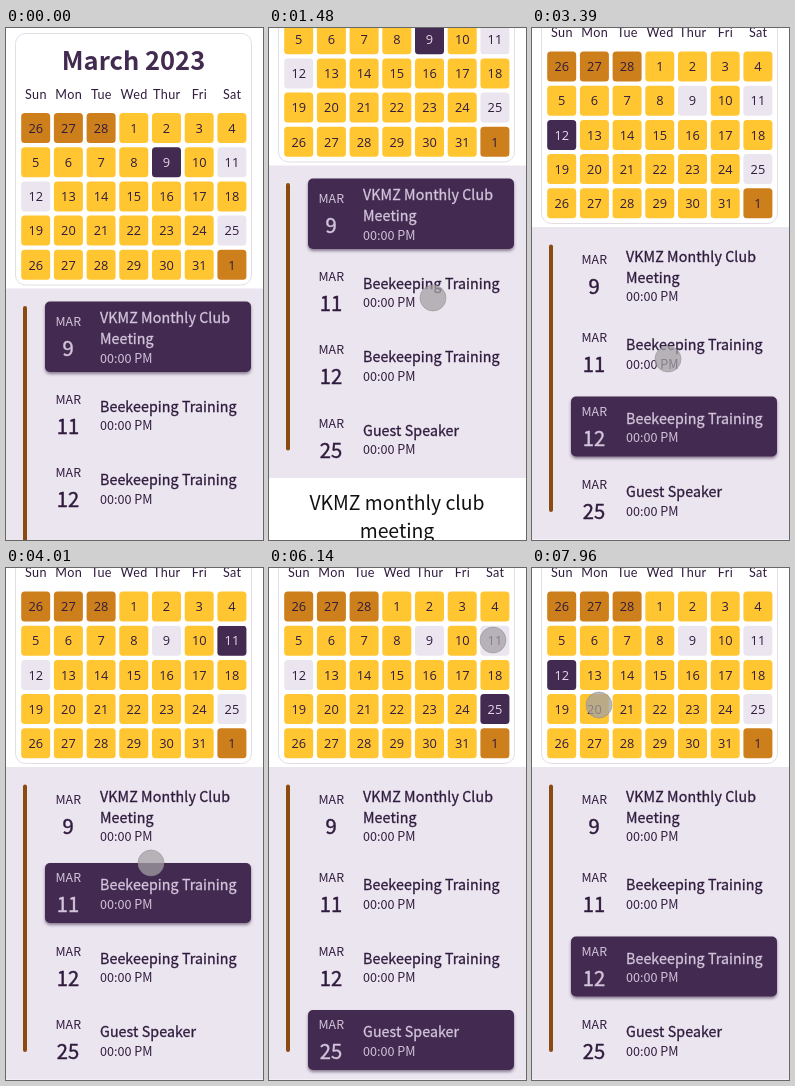
Animation, 257 px wide and 512 px high, one loop 8000 ms. Source, as an HTML page:

```html
<!DOCTYPE html>
<html lang="en">
<head>
<meta charset="utf-8">
<title>Event calendar</title>
<style>
  html, body { margin: 0; width: 100%; height: 100%; overflow: hidden; background: #fff; }
  svg { display: block; width: 257px; height: 512px; }
  text {
    font-family: "Noto Sans CJK JP", "Noto Sans CJK SC", "Noto Sans CJK", "Noto Sans", sans-serif;
    fill: #2f1b3d;
  }
  .mid { text-anchor: middle; }
  .month { font-size: 25.5px; font-weight: 700; fill: #432a50; }
  .week { font: 12.6px Lato, sans-serif; letter-spacing: .4px; }
  .day { font: 12.8px "Open Sans", sans-serif; }
  .mar { font-size: 12.4px; }
  .num { font-size: 20.2px; stroke: #2f1b3d; stroke-width: .4px; }
  .name { font-size: 14.2px; letter-spacing: .1px; stroke: #2f1b3d; stroke-width: .3px; }
  .time { font-size: 12.6px; }
  .detail { font-size: 19.4px; fill: #111; }
  .on text { fill: #d3c5dc; stroke: none; }
  .on .name, .on .num { stroke: #d3c5dc; }
  .on .day { fill: #e4d9ea; }
  .on .card { filter: drop-shadow(0 2px 1.5px rgba(40, 20, 50, .5)); }
</style>
</head>
<body>
<svg viewBox="0 0 257 512"><g id="page"></g><g id="cursor"></g></svg>
<script>
const LOOP = 8000, FADE = 140;
const PLUM = '#432a50', LILAC = '#ebe5f0', GOLD = '#ffc631', OCHRE = '#cd7f1c';
const page = document.getElementById('page');
const cursor = document.getElementById('cursor');

function add(parent, tag, attrs, content) {
  const el = document.createElementNS('http://www.w3.org/2000/svg', tag);
  for (const key in attrs) el.setAttribute(key, attrs[key]);
  if (content !== undefined) el.textContent = content;
  parent.appendChild(el);
  return el;
}
const box = (parent, x, y, width, height, rx, fill, more) =>
  add(parent, 'rect', { x, y, width, height, rx, fill, ...more });
const label = (parent, cls, x, y, str) => add(parent, 'text', { class: cls, x, y }, str);

// rows: [time, style, easing]
function play(el, rows) {
  const frames = rows.map(([t, style, easing = 'linear']) => ({ offset: t / LOOP, easing, ...style }));
  frames.push({ ...frames[frames.length - 1], offset: 1 });
  return el.animate(frames, { duration: LOOP, iterations: Infinity });
}

// [time, selected day]
const picks = [[0, 9], [2180, 12], [3850, 11], [4500, 9], [5370, 25], [6190, 11], [7030, 9], [7770, 12]];

function fadeRows(day) {
  const rows = [[0, { opacity: +(picks[0][1] === day) }]];
  for (let i = 1; i < picks.length; i++) {
    const t = picks[i][0], was = +(picks[i - 1][1] === day), now = +(picks[i][1] === day);
    if (was !== now) rows.push([t, { opacity: was }], [t + FADE, { opacity: now }]);
  }
  return rows;
}

const animations = [];
function selectable(day, draw) {
  draw(add(page, 'g', {}), false);
  const on = add(page, 'g', { class: 'on' });
  draw(on, true);
  animations.push(play(on, fadeRows(day)));
}

// Calendar
box(page, 9.5, 5.5, 236, 251.5, 10, '#fff', { stroke: '#e3dde6' });
label(page, 'month mid', 127.5, 41.5, 'March 2023');
['Sun', 'Mon', 'Tue', 'Wed', 'Thur', 'Fri', 'Sat'].forEach((d, i) =>
  label(page, 'week mid', 30 + i * 32.7, 70.5, d));

const events = [
  { day: 9, y: 273.5, lines: ['VKMZ Monthly Club', 'Meeting'] },
  { day: 11, y: 356.5, lines: ['Beekeeping Training'] },
  { day: 12, y: 430, lines: ['Beekeeping Training'] },
  { day: 25, y: 503.5, lines: ['Guest Speaker'] },
];

for (let i = 0; i < 35; i++) {
  const x = 15.2 + (i % 7) * 32.7, y = 85 + Math.floor(i / 7) * 34.2;
  const date = i - 2, inside = date > 0 && date < 32;
  const num = date < 1 ? date + 28 : inside ? date : date - 31;
  const cell = (g, fill) => {
    box(g, x, y, 29, 30, 3.5, fill);
    label(g, 'day mid', x + 14.5, y + 19.7, num);
  };
  if (inside && events.some(e => e.day === date)) selectable(date, (g, on) => cell(g, on ? PLUM : LILAC));
  else cell(page, inside ? GOLD : OCHRE);
}

// Event list
box(page, 0, 260.5, 257, 312.5, 0, LILAC);
box(page, 17, 278, 4, 267.5, 2, '#8a4b10');
for (const { day, y, lines } of events) {
  const two = lines.length > 1, shift = two ? 5 : 0;
  selectable(day, (g, on) => {
    box(g, 39, y, 206, two ? 70.5 : 60, 5, on ? PLUM : LILAC, { class: 'card' });
    label(g, 'mar mid', 62.3, y + 19.3 + shift, 'MAR');
    label(g, 'num mid', 62, y + 49.3 + shift, day);
    lines.forEach((str, i) => label(g, 'name', 94, y + (two ? 21.5 : 27) + i * 21, str));
    label(g, 'time', 94, y + (two ? 61 : 45.8), '00:00 PM');
  });
}
label(page, 'detail mid', 128, 604.5, 'VKMZ monthly club');
label(page, 'detail mid', 128, 633, 'meeting');

// Page scroll in hard notches
const scrolled = y => ({ transform: `translateY(${-y}px)` });
animations.push(play(page, [
  [0, scrolled(0), 'step-end'], [1080, scrolled(61.5), 'step-end'],
  [1480, scrolled(123), 'step-end'], [2990, scrolled(61.5), 'step-end'],
]));

// Pointer
add(cursor, 'circle', { r: 13, fill: '#a3a1a4', 'fill-opacity': .74, stroke: '#858387', 'stroke-opacity': .45 });
const path = [
  [190, 195, 486], [700, 158, 285], [880, 155, 268], [1080, 160, 269, 'step-end'],
  [1480, 164, 270], [1830, 164, 270], [2110, 133, 338], [2990, 133, 338, 'step-end'],
  [3390, 136, 331], [3660, 136, 331], [3870, 141, 318], [4010, 145, 295],
  [4290, 152, 250], [4780, 152, 250], [5230, 197, 139], [5660, 197, 139],
  [6020, 224, 72], [6480, 224, 72], [6860, 160, 72], [7280, 160, 72],
  [7700, 34, 106], [7790, 34, 106, 'linear'], [7960, 67, 137],
];
const at = (x, y, opacity = 1) => ({ transform: `translate(${x}px, ${y}px)`, opacity });
animations.push(play(cursor, [
  [0, at(195, 486, 0), 'step-end'],
  ...path.map(([t, x, y, easing = 'ease-in-out']) => [t, at(x, y), easing]),
]));

// One shared clock
const start = performance.now();
animations.forEach(a => a.pause());
(function tick() {
  const t = (performance.now() - start) % LOOP;
  animations.forEach(a => { a.currentTime = t; });
  requestAnimationFrame(tick);
})();
</script>
</body>
</html>
```
